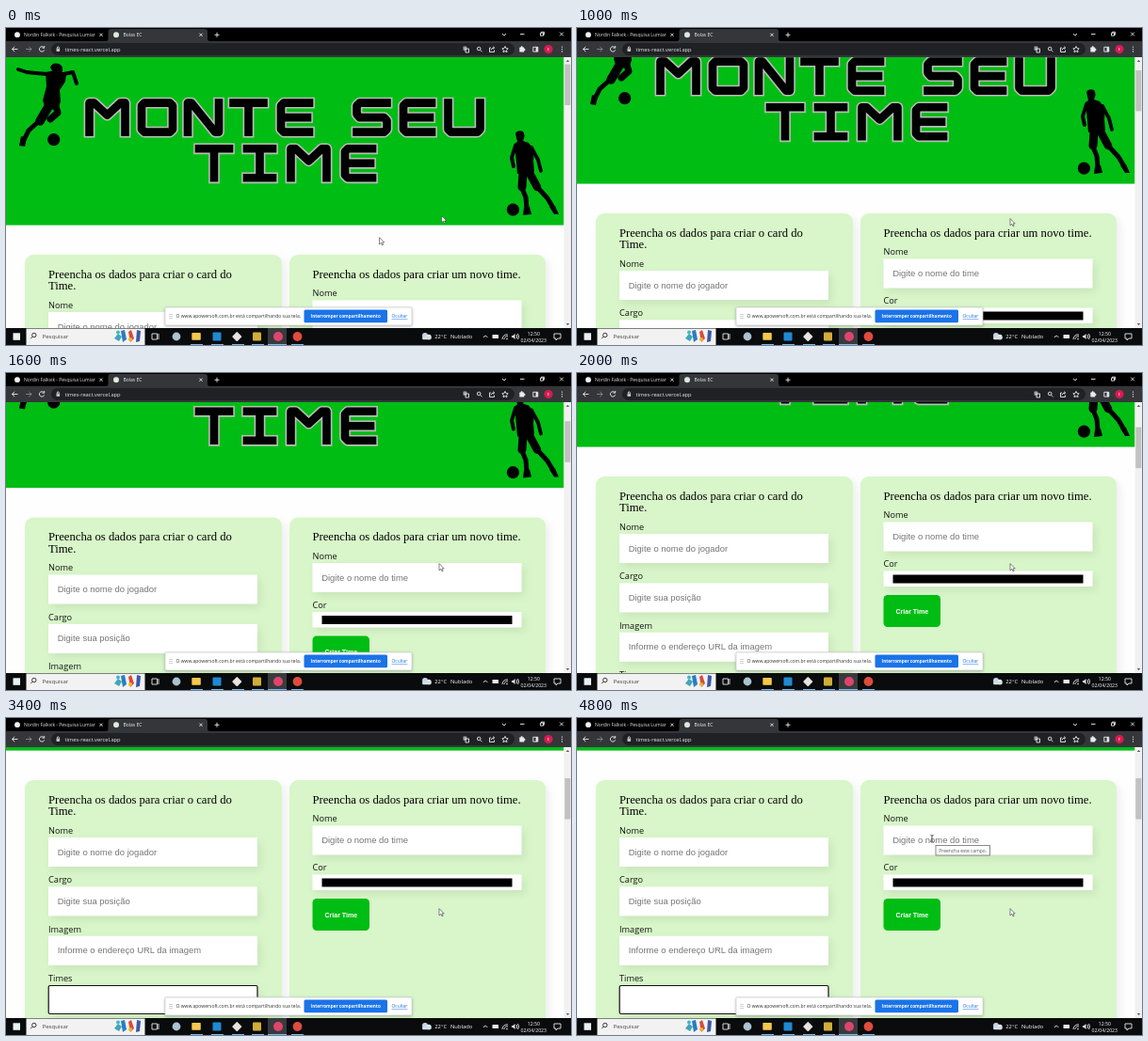
Write an HTML page that moves like this. It is 600 px wide and 337 px high and loops after 5600 ms.

```html
<!DOCTYPE html>
<html lang="pt-BR">
<head>
<meta charset="utf-8">
<title>Monte seu time</title>
<style>
  html, body { margin: 0; width: 100%; height: 100%; overflow: hidden; background: #fff; }
  svg { display: block; width: 600px; height: 337px; }
  text { font-family: "Open Sans", "Noto Sans", sans-serif; white-space: pre; }
  .serif { font-family: "Liberation Serif", "Times New Roman", serif; font-size: 12.65px; }
  .arial { font-family: "Liberation Sans", Arial, sans-serif; }
  .label { font-size: 9.2px; fill: #111; }
  .hint { font-size: 9.45px; fill: #757575; }
  .soft { filter: drop-shadow(3px 4px 4px rgba(0, 0, 0, .07)); }
  .icon { fill: none; stroke: #e8eaed; stroke-width: .9; }
</style>
</head>
<body>
<svg id="stage" viewBox="0 0 600 337" xmlns="http://www.w3.org/2000/svg"></svg>
<script>
const LOOP = 5600;
const GREEN = '#00bd14';

// [start ms, scroll offset]
const SCROLL = [[0, 0], [800, 22], [1000, 44], [1400, 66], [1600, 87.5], [1800, 109], [2000, 131], [3200, 153], [3400, 175]];
// [start ms, x, y, pointer shape]
const POINTER = [[0, 396.5, 222.7, 'arrow'], [200, 430, 212, 'arrow'], [400, 460, 202.6, 'arrow'],
  [3600, 438, 181, 'arrow'], [3800, 406, 152, 'arrow'], [4000, 386, 135, 'beam'], [4200, 377, 128, 'beam']];
// [start ms, x, y, visible]: pointer left behind by the recorder
const TRAIL = [[0, 462.6, 199.6, 1], [400, 460, 202.6, 0], [3600, 460, 202.6, 1]];
const TIP_AT = 4800;

const rect = (x, y, w, h, fill, r = 0, more = '') =>
  `<rect x="${x}" y="${y}" width="${w}" height="${h}" rx="${r}" fill="${fill}" ${more}/>`;
const dot = (x, y, r, fill) => `<circle cx="${x}" cy="${y}" r="${r}" fill="${fill}"/>`;
const shape = (d, fill = '#000', more = '') => `<path d="${d}" fill="${fill}" ${more}/>`;
const line = (d, more = '') => `<path class="icon" d="${d}" ${more}/>`;
const text = (x, y, s, cls = '', more = '') => `<text x="${x}" y="${y}" class="${cls}" ${more}>${s}</text>`;
const small = (x, y, s, size, fill, more = '') => text(x, y, s, '', `font-size="${size}" fill="${fill}" ${more}`);

// Block letters on a 43px cap height, drawn as centre lines
const GLYPHS = {
  M: w => `M6 37V6H11L${w / 2} 19L${w - 11} 6H${w - 6}V37`,
  O: w => `M9 6H${w - 9}L${w - 6} 9V34L${w - 9} 37H9L6 34V9Z`,
  N: w => `M6 37V6H10L${w - 10} 37H${w - 6}V6`,
  T: w => `M6 6H${w - 6}M${w / 2} 7V37`,
  I: w => `M6 6H${w - 6}M${w / 2} 7V36M6 37H${w - 6}`,
  E: w => `M${w - 6} 6H9L6 9V34L9 37H${w - 6}M7 21.500H${w - 8}`,
  S: w => `M${w - 6} 6H9L6 9V18L9 21.500H${w - 9}L${w - 6} 25V34L${w - 9} 37H6`,
  U: w => `M6 6V34L9 37H${w - 9}L${w - 6} 34V6`
};
const LETTERS = [
  ['M', 82.5, 50], ['O', 138, 45], ['N', 187, 45], ['T', 235.5, 44], ['E', 286, 42],
  ['S', 366.5, 44], ['E', 416, 42], ['U', 463.5, 46],
  ['T', 199, 44, 1], ['I', 250, 39, 1], ['M', 296.5, 50, 1], ['E', 354, 41, 1]
];
function letter([ch, x, w, row = 0]) {
  const d = GLYPHS[ch](w);
  const stroke = (color, width) => `<path d="${d}" fill="none" stroke="${color}" stroke-width="${width}" stroke-linecap="square" stroke-linejoin="round"/>`;
  return `<g transform="translate(${x} ${73.6 + row * 48.7})">${stroke('#b9bdb9', 11.8)}${stroke('#000', 8.6)}</g>`;
}

const limb = (d, w) => `<path d="${d}" fill="none" stroke="#000" stroke-width="${w}" stroke-linecap="round" stroke-linejoin="round"/>`;
const kicker =
  shape('M47 42Q49 36 56 38Q61 40 60 46Q57 51 51 49Z') +
  shape('M42 47L52 45L64 48L63 57L57 66L58 78L55 87L42 86L39 77L43 62Z') +
  limb('M44 49L32 48L22 47L13 44', 3.8) + limb('M61 49L71 47L75 59', 4) +
  limb('M46 82L36 99', 9.5) + limb('M35 99L24 109L19 119', 5) + shape('M16 115L22 117L20 126L14 125Z') +
  limb('M52 80L55 90L47 97', 7) + dot(50.7, 118.7, 6.6);
const dribbler =
  shape('M541 112Q543 108 549 110Q552 114 549 120L543 121Z') +
  shape('M540 123L546 119L555 122L561 130L560 141L561 153L543 155L542 143Z') +
  limb('M541 125L537 138L539 147', 4) + limb('M558 127L565 140L568 152', 3.8) +
  limb('M549 155L548 169', 9) + limb('M547 168L552 180L553 192', 5) +
  limb('M556 154L564 169', 8.5) + limb('M564 169L575 181L581 191', 5) +
  shape('M550 191L556 190L558 198L549 199Z') + shape('M577 190L583 189L587 198L582 198Z') + dot(538.4, 193.2, 6.6);

const box = (x, y) => rect(x, y, 222, 31, '#fff', 0, 'class="soft"');
const field = (x, base, name, hint) =>
  text(x, base + .4, name, 'label') + box(x, base + 4.5) + text(x + 9.7, base + 23, hint, 'arial hint');

const page =
  rect(0, 31, 592.5, 178.6, GREEN) + LETTERS.map(letter).join('') + kicker + dribbler +
  [[20, 273], [301, 272]].map(([x, w]) => rect(x, 241, w, 340, '#d8f6c9', 9, 'class="soft"')).join('') +
  text(45, 265.5, 'Preencha os dados para criar o card do', 'serif') + text(45, 278.2, 'Time.', 'serif') +
  [['Nome', 'Digite o nome do jogador'], ['Cargo', 'Digite sua posição'], ['Imagem', 'Informe o endereço URL da imagem'], ['Times', '']]
    .map(([name, hint], i) => field(45, 297.5 + 52.4 * i, name, hint)).join('') +
  rect(45.2, 459.5, 221.8, 30, 'none', 1.5, 'stroke="#111" stroke-width="1.2"') +
  text(325.5, 265.5, 'Preencha os dados para criar um novo time.', 'serif') +
  field(325.5, 285, 'Nome', 'Digite o nome do time') +
  text(325.5, 337.4, 'Cor', 'label') +
  rect(325.5, 341.5, 222, 16.5, '#fff', 0, 'class="soft"') + rect(335.5, 345.5, 202, 9, '#000') +
  rect(325.5, 367, 60.5, 34, GREEN, 4.4) +
  text(355.8, 386.6, 'Criar Time', 'arial', 'font-size="7.05" font-weight="700" fill="#fff" text-anchor="middle"');

const cross = (x, y, r) => `M${x - r} ${y - r}l${2 * r} ${2 * r}m0 ${-2 * r}l${-2 * r} ${2 * r}`;
const browser =
  rect(0, 0, 600, 15, '#000') + rect(0, 14, 600, 17, '#35363a') +
  shape('M106 14Q108.500 14 108.500 11.500V4Q108.500 1 111.500 1H211Q214 1 214 4V11.500Q214 14 216.500 14Z', '#35363a') +
  dot(12, 7.2, 2.9, '#f1f3f4') + small(19, 9.1, 'Nordin Falkvik - Pesquisa Lumiar', 5, '#e3e5e8') +
  dot(117, 7.2, 3, '#dfeadf') + small(124.5, 9.1, 'Bolas EC', 5, '#f1f3f4') +
  line(cross(101, 7.3, 1.6)) + line(cross(207, 7.3, 1.6)) + line('M221.500 7.300h5m-2.500 -2.500v5') +
  line('M527 6l2 2l2 -2') + line('M546 6.500h4.500M567.500 5.200h3v3h-3zM568.500 5.200v-1h3v3h-1', 'stroke-width=".7"') + line(cross(590, 6.5, 1.9)) +
  line('M12.500 22.500H6.500m2.700 -2.700l-2.700 2.700l2.700 2.700') +
  line('M21 22.500h6m-2.700 -2.700l2.700 2.700l-2.700 2.700', 'opacity=".45"') +
  line('M40.200 20.700a2.700 2.700 0 1 0 .5 2.600M40.700 19v2.200h-2.200') +
  rect(48, 16, 492, 13, '#202124', 6.5) +
  rect(53.5, 22, 3.6, 3, '#bdc1c6', .4) + line('M54.300 22v-1a1 1 0 0 1 2 0v1', 'stroke-width=".6"') +
  small(62.5, 24.6, 'times-react.vercel.app', 5.75, '#e8eaed') +
  rect(485.5, 19.5, 3.8, 4.2, '#9fa3a8', .4) + line('M488 22h3.500v4h-3.500z', 'stroke-width=".7"') +
  line('M504 22a1.800 1.800 0 1 1 -3.600 0a1.800 1.800 0 1 1 3.600 0m-.5 1.300l2 2', 'stroke-width=".7"') +
  line('M515 21h-1.500v4.500h5v-2M515 23.500q.5 -2.500 3.500 -2.500m-1.300 -1.300l1.500 1.300l-1.500 1.300', 'stroke-width=".7"') +
  line('M530 19.500l1 2.100l2.200 .3l-1.600 1.500l.4 2.300l-2 -1.100l-2 1.100l.4 -2.300l-1.600 -1.500l2.200 -.3z', 'stroke-width=".7"') +
  rect(545.3, 20.6, 5, 5, '#e8eaed', .6) + dot(547.7, 20.4, 1.1, '#e8eaed') + dot(550.4, 23, 1.1, '#e8eaed') +
  line('M559.800 20.300h5v4.800h-5z') + rect(562.6, 20.3, 2.2, 4.8, '#e8eaed') +
  dot(576, 22.6, 4.6, '#d81b50') + small(576, 24.2, 'E', 4.3, '#fff', 'text-anchor="middle"') +
  [20.2, 22.6, 25].map(y => dot(590.5, y, .65, '#e8eaed')).join('');

const scrollbar = rect(592.5, 31, 7.5, 288, '#f1f1f1') +
  shape('M594.700 36l1.800 -2l1.800 2z', '#555') + shape('M594.700 314l1.800 2l1.800 -2z', '#555') +
  rect(593.3, 38.5, 6, 43.5, '#c1c1c1', 0, 'id="thumb"');

const shareBar =
  rect(169, 297, 262, 19, '#fff', 1, 'stroke="#c9cccf" stroke-width=".7" style="filter:drop-shadow(0 1px 1.500px rgba(0,0,0,.25))"') +
  [0, 1, 2].map(i => dot(174, 304.5 + 2 * i, .5, '#888') + dot(176, 304.5 + 2 * i, .5, '#888')).join('') +
  small(180.5, 308.3, 'O www.apowersoft.com.br está compartilhando sua tela.', 5, '#333') +
  rect(316.5, 299.5, 88.5, 13.8, '#1a73e8', 1.5) +
  small(360.7, 308.1, 'Interromper compartilhamento', 4.7, '#fff', 'font-weight="700" text-anchor="middle"') +
  small(409.5, 308.2, 'Ocultar', 4.9, '#1a73e8', 'text-decoration="underline"');

const taskbar =
  rect(0, 319, 600, 18, '#0a0b0d') + rect(7.5, 324.3, 7.5, 7.5, '#e9f1f5') +
  rect(21.5, 319.5, 126, 17.5, '#f2f2f2') +
  line('M32 326.500a2.200 2.200 0 1 1 -4.400 0a2.200 2.200 0 1 1 4.400 0m-3.800 1.700l-2 2', 'style="stroke:#222"') +
  small(38.5, 330.3, 'Pesquisar', 6.1, '#444') +
  shape('M115 330l4 -5l4 3l-3 5z', '#3fa6b9') + shape('M122 322l4 -1l2 10l-4 3z', '#2b7cc1') +
  shape('M130 323l3 -2l3 9l-4 4z', '#d84a3a') + shape('M139 321l4 1l-1 11l-4 1z', '#3a5aa8') +
  dot(119, 323.5, 2, '#3fb6c9') + dot(132, 331, 2, '#f0b429') +
  line('M155 325h5.500v6h-5.500zM162 325v6') +
  rect(278, 319, 20, 18, '#383b3e') +
  dot(181, 328, 4.4, '#a9c3d0') + rect(197.3, 324, 9.5, 7.8, '#f5c84c', .8) + rect(219.5, 323.5, 9, 9, '#1f8ad2', 1) +
  rect(241.5, 324.3, 7.6, 7.6, '#e8e3df', 1, 'transform="rotate(45 245.300 328.100)"') +
  rect(262, 323.5, 9, 9, '#d2ad38', 1) + dot(289, 328, 5, '#e0446c') + dot(309.5, 328, 4.9, '#df4c3d') +
  [196, 218, 240, 261, 278, 303].map((x, i) => rect(x, 336, i === 4 ? 20 : 13, 1, '#76b9ed')).join('') +
  dot(445, 327, 3, '#c7d6e4') + dot(449, 328.5, 2.7, '#e3e9ee') + rect(442, 328, 9.5, 3.3, '#d4dfe8', 1.6) +
  small(455.3, 330.2, '22°C', 5.8, '#fff') + small(472, 330.2, 'Nublado', 5.8, '#fff') +
  line('M507 329l2.200 -2.200l2.200 2.200') + rect(516.5, 326, 6.5, 4, '#e8eaed', .5) +
  line('M527 331a5 5 0 0 1 6 -5M529 331a3 3 0 0 1 4 -3') + dot(532, 330.6, .8, '#e8eaed') +
  shape('M537 327h1.500l2 -2v6l-2 -2h-1.500z', '#e8eaed') + line('M542 326q1.500 2 0 4M543.500 325q2.300 3 0 6', 'stroke-width=".6"') +
  small(560.3, 326.7, '12:50', 5.2, '#fff', 'text-anchor="middle"') +
  small(560.3, 334.3, '02/04/2023', 5.2, '#fff', 'text-anchor="middle"') +
  line('M582 325h7v5h-3l-2 2v-2h-2z');

const ARROW = 'M0 0V7.300L1.800 5.700L3 8.300L4.100 7.800L3 5.300H5.200Z';
const arrow = id => shape(ARROW, '#fff', `id="${id}" stroke="#333" stroke-width=".6"`);
const tip = `<g id="tip">${rect(381, 135.5, 57.5, 10.5, '#fff', 0, 'stroke="#6b6b6b" stroke-width=".8"')}${small(384.3, 142.6, 'Preencha este campo.', 4.95, '#575757')}</g>`;

const $ = id => document.getElementById(id);
$('stage').innerHTML =
  `<clipPath id="view">${rect(0, 31, 593, 288, '#fff')}</clipPath>${rect(0, 0, 600, 337, '#fefefe')}
  <g clip-path="url(#view)"><g id="page">${page}</g></g>
  ${scrollbar}${tip}${arrow('trail')}${arrow('arrow')}
  <path id="beam" d="M-1.500 -3.500Q0 -3.500 0 -2.500Q0 -3.500 1.500 -3.500M0 -2.500V2.500M-1.500 3.500Q0 3.500 0 2.500Q0 3.500 1.500 3.500" fill="none" stroke="#222" stroke-width=".8"/>
  ${browser}${shareBar}${taskbar}`;

const at = (steps, t) => steps.findLast(s => s[0] <= t);
const place = (el, x, y) => el.setAttribute('transform', `translate(${x} ${y})`);
const show = (el, on) => el.setAttribute('visibility', on ? 'visible' : 'hidden');
const pageGroup = $('page'), thumb = $('thumb'), trail = $('trail'), tipBox = $('tip');
const pointers = { arrow: $('arrow'), beam: $('beam') };

function draw(t) {
  const [, scroll] = at(SCROLL, t);
  place(pageGroup, 0, -scroll);
  place(thumb, 0, scroll * .146);
  const [, x, y, kind] = at(POINTER, t);
  for (const name in pointers) {
    place(pointers[name], x, y);
    show(pointers[name], name === kind);
  }
  const [, tx, ty, on] = at(TRAIL, t);
  place(trail, tx, ty);
  show(trail, on);
  show(tipBox, t >= TIP_AT);
}

const start = performance.now();
function tick() {
  draw((performance.now() - start) % LOOP);
  requestAnimationFrame(tick);
}
tick();
</script>
</body>
</html>
```
